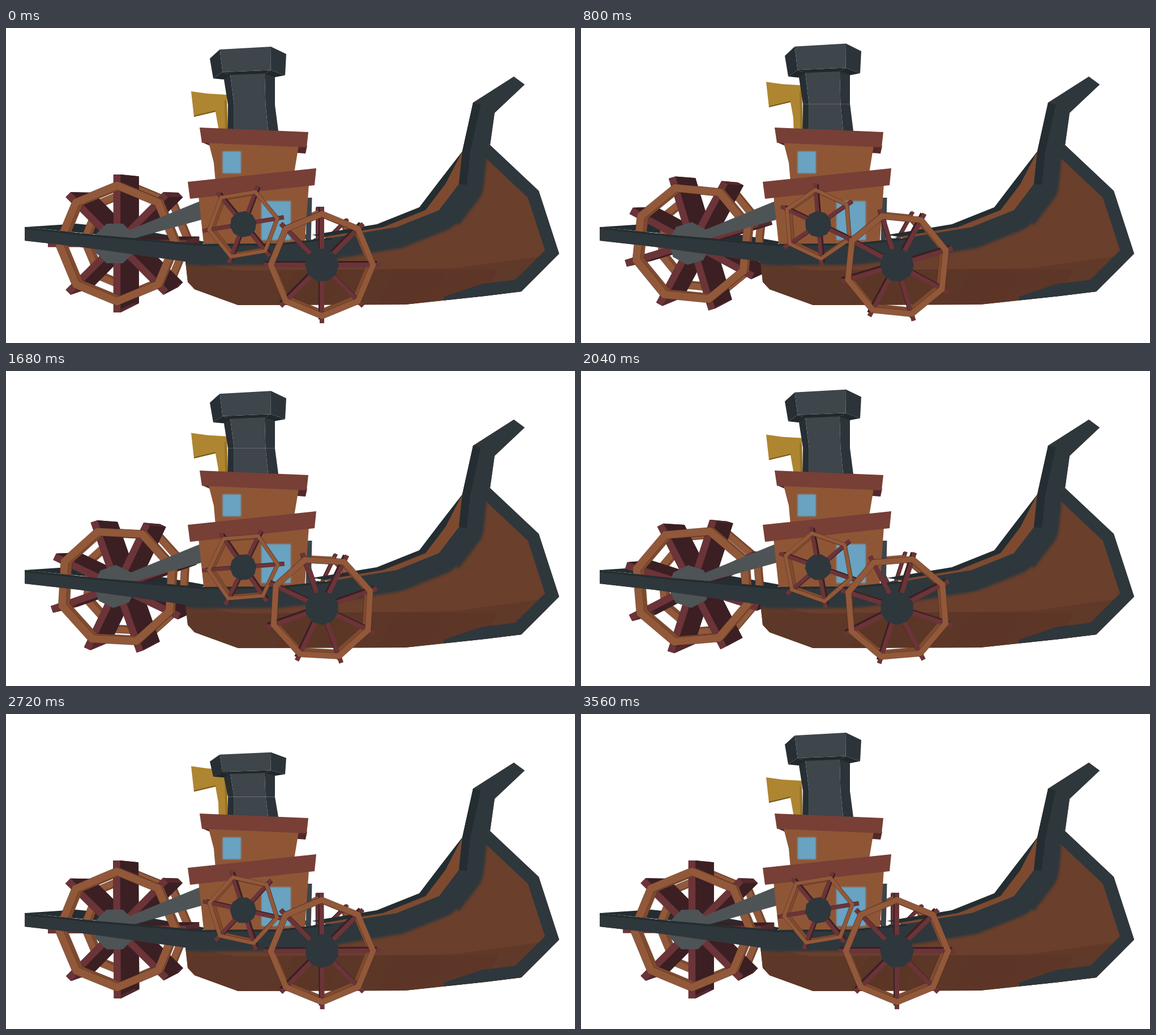
An HTML page with a canvas that plays this animation: 1005x557 px, repeating every 3600 ms.

```html
<!DOCTYPE html>
<html>
<head>
<meta charset="utf-8">
<style>
  html, body { margin: 0; width: 100%; height: 100%; overflow: hidden; background: #fff; }
  canvas { display: block; }
</style>
</head>
<body>
<canvas id="stage" width="1005" height="557"></canvas>
<script>
const ctx = document.getElementById('stage').getContext('2d');
const STEP = 40, FRAMES = 90, TAU = Math.PI * 2;
const RING = '#92583a', RING_BACK = '#7f4a2e', SPOKE = '#6b3438', SHADE = '#3b1f23';
const IRON = '#2e373c', IRON_DARK = '#242d31', IRON_LIGHT = '#3e454b';
const WOOD = '#8f5636', ROOF = '#773f36', GLASS = '#69a3c1', STEEL = '#4e5356';

// Key points of the hull outline, flat x, y lists
const RAIL = [33, 352, 160, 366, 345, 382, 480, 381, 575, 371, 690, 352, 765, 322, 800, 276, 806, 218];
const PROW = [825, 132, 897, 86, 916, 100, 863, 150, 855, 207];
const BOW = [855, 207, 941, 288, 977, 399, 910, 466, 845, 474];
const BILGE = [705, 489, 410, 490, 333, 462, 321, 449, 317, 413, 130, 387, 33, 376];

const mix = (a, b, x) => a + (b - a) * x;
const smooth = x => x * x * (3 - 2 * x);

function trace(p) {
  ctx.moveTo(p[0], p[1]);
  for (let i = 2; i < p.length; i += 2) ctx.lineTo(p[i], p[i + 1]);
}
function poly(color, ...p) {
  ctx.beginPath();
  trace(p);
  ctx.fillStyle = color;
  ctx.fill();
}
function line(color, width, ...p) {
  ctx.beginPath();
  trace(p);
  ctx.strokeStyle = color;
  ctx.lineWidth = width;
  ctx.stroke();
}
function blurred(radius, paint) {
  ctx.filter = `blur(${radius}px)`;
  paint();
  ctx.filter = 'none';
}

function ngon(cx, cy, r, n, a) {
  const p = [];
  for (let i = 0; i < n; i++) {
    const b = a + i * TAU / n;
    p.push(cx + r * Math.cos(b), cy + r * Math.sin(b));
  }
  return p;
}
function ring(color, cx, cy, r, inner, n, a) {
  ctx.beginPath();
  for (const size of [r, inner]) {
    trace(ngon(cx, cy, size, n, a));
    ctx.closePath();
  }
  ctx.fillStyle = color;
  ctx.fill('evenodd');
  ctx.strokeStyle = 'rgba(50,28,20,.45)';
  ctx.lineWidth = 0.8;
  ctx.stroke();
}

// Rim with thickness: the rear edge is shifted by (dx, dy) and scaled by k
function rim(cx, cy, r, inner, n, a, dx, dy, k) {
  ring(RING_BACK, cx + dx, cy + dy, r * k, inner * k, n, a);
  ring(RING, cx, cy, r, inner, n, a);
}

function thinWheel(cx, cy, r, n, a, dx, dy, k, width, tip, hub) {
  const inner = r * 0.88;
  ring(RING_BACK, cx + dx, cy + dy, r * k, inner * k, n, a);
  for (const [color, x, y, s] of [[SHADE, cx + dx, cy + dy, k], [SPOKE, cx, cy, 1]]) {
    const ends = ngon(x, y, tip * s, n, a);
    for (let i = 0; i < ends.length; i += 2) line(color, width, x, y, ends[i], ends[i + 1]);
  }
  ring(RING, cx, cy, r, inner, n, a);
  poly(IRON, ...ngon(cx, cy, hub, 10, a));
}

// Two rims joined by deep paddles
function sternWheel(a) {
  const n = 8, near = [196, 381, 1], far = [229, 374.5, 0.92];
  const at = ([x, y, s], b, r, w) => [
    x + s * (r * Math.cos(b) - w * Math.sin(b)),
    y + s * (r * Math.sin(b) + w * Math.cos(b))
  ];
  rim(far[0], far[1], 98, 85, n, a, 4, -1, 0.985);
  const faces = [];
  for (let i = 0; i < n; i++) {
    const b = a + i * TAU / n;
    const corners = c => [[25, -6.2], [122, -6.2], [122, 6.2], [25, 6.2]].map(([r, w]) => at(c, b, r, w));
    const front = corners(near), back = corners(far);
    poly(SHADE, ...back.flat());
    for (let e = 0; e < 3; e++)
      poly(e === 1 ? '#52292d' : SHADE, ...front[e], ...front[e + 1], ...back[e + 1], ...back[e]);
    faces.push(front.flat());
  }
  faces.forEach(f => poly(SPOKE, ...f));
  rim(near[0], near[1], 110, 95, n, a, 5, -1, 0.985);
  poly(STEEL, ...ngon(192, 381, 38, n, a + TAU / 16));
  poly(STEEL, 216, 358, 348, 304, 349, 338, 226, 372);
}

// Three visible faces between levels of [left, right, y, skew]
function prism(levels, colors) {
  const corner = ([l, r, y, skew], i) =>
    [mix(l, r, [0, 0.13, 0.8, 1][i]), y + skew * [16, 0, -5, 8][i]];
  for (let j = 1; j < levels.length; j++)
    for (const i of [0, 2, 1])
      poly(colors[i], ...corner(levels[j - 1], i), ...corner(levels[j - 1], i + 1),
        ...corner(levels[j], i + 1), ...corner(levels[j], i));
}

function chimney(top) {
  const base = 181, sides = ['#272f34', IRON_LIGHT, '#2c3439'];
  const brim = [366, 493, 78, 0.7];
  ctx.save();
  ctx.translate(0, base);
  ctx.scale(1, (base - top) / 148);
  ctx.translate(0, -base);
  prism([[384, 475, 80, 0.3], [392, 475, 136, 0], [391, 482, 190, 0]], sides);
  prism([brim, [384, 475, 83, 0.5]], Array(3).fill('#20282c'));
  prism([[360, 495, 38, 1], brim], sides);
  ctx.restore();
}

function horn(dy) {
  ctx.save();
  ctx.translate(0, dy);
  poly('#ae8530', 327, 112, 356, 116, 390, 118, 392, 215, 376, 215, 375, 176, 370, 148, 332, 157);
  line('#75571e', 2, 332, 156, 370, 147);
  line('#997225', 4, 388, 128, 390, 215);
  ctx.restore();
}

function roof(x0, y0, x1, y1, h) {
  poly(ROOF, x0, y0, x1, y1, x1 - 3, y1 + h, x0 + 4, y0 + h);
}
function pane(x, y, w, h) {
  ctx.fillStyle = GLASS;
  blurred(1.2, () => ctx.fillRect(x, y, w, h));
}
function cabin() {
  line('#3b454a', 9, 536, 300, 534, 380);
  poly('#52292a', 346, 202, 532, 208, 529, 222, 362, 209);
  poly(WOOD, 358, 203, 517, 208, 509, 256, 370, 272, 367, 238);
  pane(382.5, 218, 32.5, 39);
  roof(342, 176, 534, 184, 27);
  poly(WOOD, 340, 296, 535, 275, 527, 390, 350, 390);
  pane(451, 306, 52, 69);
  roof(321, 272, 548, 248, 30);
}

// Inside of the opposite bulwark: the rail pushed left, fading out towards the prow
function farSide() {
  const part = RAIL.slice(8);
  for (const [color, push, lift] of [[IRON_DARK, 35, 5], ['#7d4a30', 24, 0]]) {
    const edge = [];
    for (let i = 0; i < part.length; i += 2) {
      const fade = Math.min(1, (part[i + 1] - 218) / 50);
      edge.unshift(part[i] - push * fade, part[i + 1] - lift * fade);
    }
    poly(color, ...part, ...edge);
  }
}

function hull() {
  ctx.save();
  ctx.lineJoin = 'round';
  ctx.beginPath();
  trace([...RAIL, ...PROW, ...BOW, ...BILGE]);
  ctx.clip();
  ctx.fillStyle = '#6a3f2c';
  ctx.fillRect(0, 0, 1005, 557);
  poly('#603929', 317, 412, 410, 429, 790, 425, 957, 402, 957, 500, 317, 500);

  let seed = 7;
  for (let x = 330; x < 900; x += 90) {
    seed = seed * 16807 % 2147483647;
    poly(`rgba(40,15,5,${seed % 100 / 1100})`, x, 427, x + 90, 427, x + 50, 500, x - 40, 500);
  }

  line(IRON, 44, ...BOW, 780, 496);
  blurred(2, () => {
    line(IRON, 76, ...RAIL);
    line(IRON, 88, ...RAIL.slice(12), ...PROW);
  });
  line(IRON_DARK, 7, ...RAIL.slice(0, 10));
  line(IRON_DARK, 28, ...RAIL.slice(14), ...PROW.slice(0, 2));
  ctx.restore();
}

// Sudden squash, slow swell past rest, then a pause
function chimneyTop(frame) {
  const q = frame > 87 ? 0 : frame % 29.33;
  if (q < 4) return mix(33, 75, 1 - (1 - q / 4) ** 3);
  if (q < 7.5) return 75;
  if (q < 16.2) return mix(75, 13, smooth((q - 7.5) / 8.7));
  if (q < 22) return mix(13, 33, smooth((q - 16.2) / 5.8));
  return 33;
}

function draw(now) {
  const frame = Math.floor(now % (STEP * FRAMES) / STEP);
  const u = frame / (FRAMES - 1);
  const lag = u * (1 - u) * (49.5 - 25.5 * u);
  const rad = Math.PI / 180;
  const turn = (360 * u - lag) * rad;
  const counter = (-9.5 - 360 * u - lag * 0.55) * rad;

  ctx.fillStyle = '#fff';
  ctx.fillRect(0, 0, 1005, 557);
  poly(IRON_DARK, 33, 352, 124, 346, 240, 358, 352, 378, 345, 384);
  thinWheel(551, 391, 69, 8, turn, -1, -1, 0.97, 6, 75, 20);
  sternWheel(turn);
  farSide();
  horn(10.8 * Math.cos(TAU * (2 * u - 0.08)) - 9.5);
  chimney(chimneyTop(frame));
  cabin();
  hull();
  thinWheel(419, 347, 65, 6, counter, 3, -1, 0.95, 7, 73, 23.5);
  thinWheel(558, 419, 96, 8, turn, -2, -3, 0.965, 8, 103, 30);
}

function tick() {
  draw(performance.now());
  requestAnimationFrame(tick);
}
tick();
</script>
</body>
</html>
```
